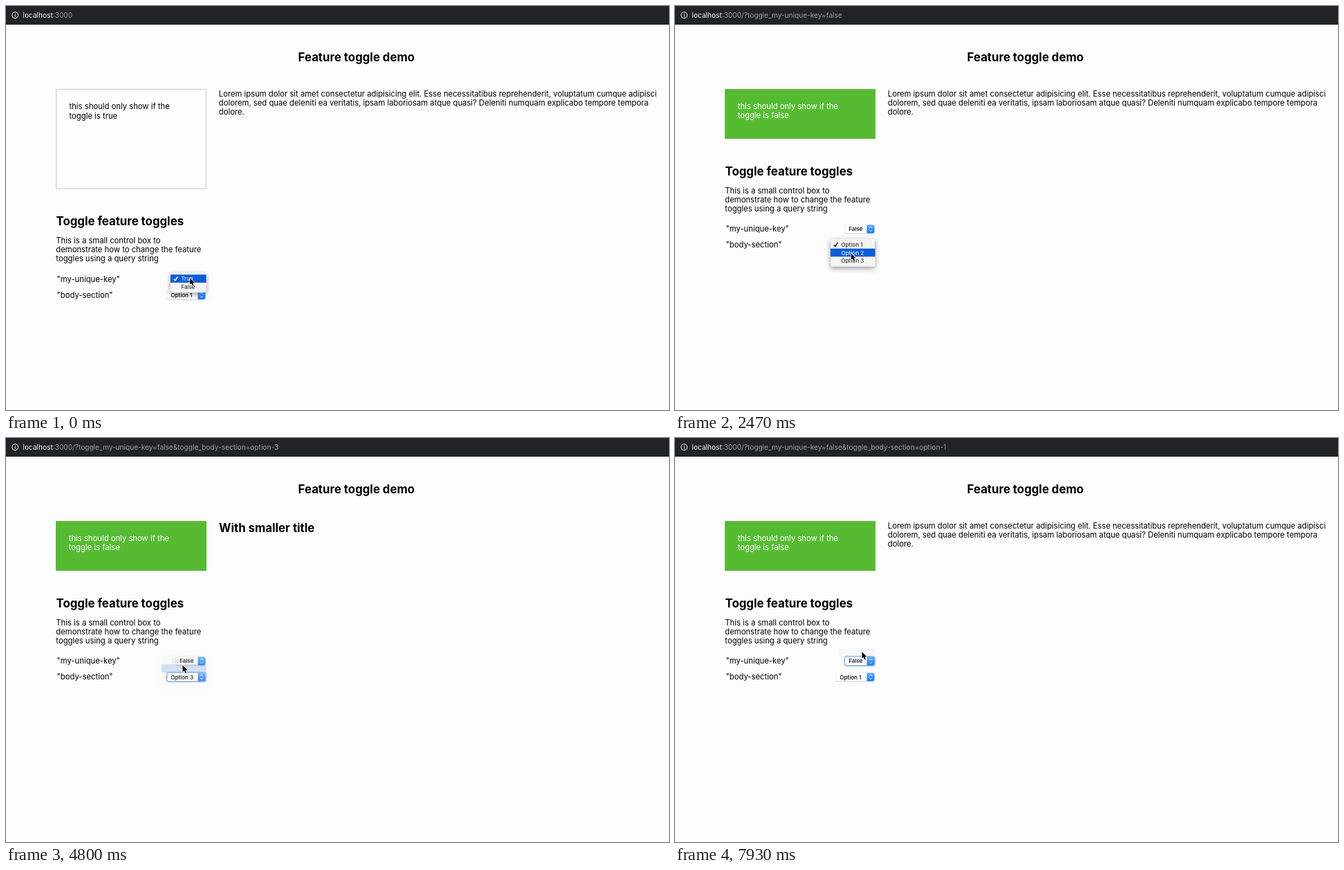
These frames come from a looping animation (959x584 px, 8000 ms). An HTML page with a canvas:

```html
<!DOCTYPE html>
<html lang="en">
<head>
<meta charset="utf-8">
<title>Feature toggle demo</title>
<style>
  html, body { margin: 0; width: 100%; height: 100%; overflow: hidden; background: #fefdfe; }
  canvas { display: block; width: 959px; height: 584px; }
</style>
</head>
<body>
<canvas id="stage"></canvas>
<script>
const W = 959, H = 584, LOOP = 8000, FRAME = 1000 / 15;
const ROW = 11.7, PAD = 2.6, FADE = 180;
const canvas = document.getElementById('stage');
const ctx = canvas.getContext('2d');
const ratio = window.devicePixelRatio || 1;
canvas.width = W * ratio;
canvas.height = H * ratio;

const BODY = '11.28px Inter, sans-serif';
const HEADING = 'bold 16.8px Inter, sans-serif';
const SMALL_HEADING = 'bold 13.6px Inter, sans-serif';
const ADDRESS = '10.15px Inter, sans-serif';
const CONTROL = '500 8.1px Inter, sans-serif';
const MENU_ITEM = '8.2px Inter, sans-serif';

const KEY_OPTIONS = ['True', 'False'];
const BODY_OPTIONS = ['Option 1', 'Option 2', 'Option 3'];

// Page states: start time, key value, body value, address query, focused select
const pages = [
  { at: 0, key: 0, body: 0, query: '', focus: 'key' },
  { at: 1070, key: 1, body: 0, query: '/?toggle_my-unique-key=false', focus: 'key' },
  { at: 2250, focus: 'body' },
  { at: 2960, body: 2, query: '/?toggle_my-unique-key=false&toggle_body-section=option-3' },
  { at: 4860, body: 1, query: '/?toggle_my-unique-key=false&toggle_body-section=option-2' },
  { at: 6530, body: 0, query: '/?toggle_my-unique-key=false&toggle_body-section=option-1' },
  { at: 7190, focus: 'key' }
];

// Each menu is open until `pick`, then fades out.
const menus = [
  { from: 0, pick: 840, select: 'key' },
  { from: 2250, pick: 2750, select: 'body' },
  { from: 4050, pick: 4650, select: 'body' },
  { from: 5530, pick: 6320, select: 'body' },
  { from: 7190, pick: 7760, select: 'key' }
];

// Pointer path: time, x, y
const path = [
  [0, 266, 393], [200, 266, 393], [600, 262, 406], [1720, 262, 406],
  [2130, 255, 345], [2300, 255, 345], [2620, 254.5, 368], [2960, 254.5, 368],
  [3150, 254.5, 356], [3560, 254.5, 356], [3850, 255, 345], [4150, 255, 345],
  [4500, 255.5, 328.5], [4950, 255.5, 328.5], [5350, 252.5, 346], [5850, 252.5, 346],
  [6150, 253, 332], [6500, 253, 332], [6860, 272, 322], [7250, 272, 322],
  [7560, 270.5, 309], [8000, 270.5, 309]
];

function pointerAt(t) {
  const i = Math.max(1, path.findIndex(p => p[0] > t));
  const [t0, x0, y0] = path[i - 1], [t1, x1, y1] = path[i];
  const u = (t - t0) / (t1 - t0), e = u * u * (3 - 2 * u);
  return { x: x0 + (x1 - x0) * e, y: y0 + (y1 - y0) * e };
}

function text(str, x, y, font = BODY, color = '#000') {
  ctx.font = font;
  ctx.fillStyle = color;
  ctx.fillText(str, x, y);
}

function lines(list, x, y, color) {
  list.forEach((line, i) => text(line, x, y + i * 13.1, BODY, color));
}

function rounded(x, y, w, h, r, fill) {
  ctx.beginPath();
  ctx.roundRect(x, y, w, h, r);
  ctx.fillStyle = fill;
  ctx.fill();
}

function stroke(points, color, width) {
  ctx.beginPath();
  points.forEach(([x, y]) => ctx.lineTo(x, y));
  ctx.strokeStyle = color;
  ctx.lineWidth = width;
  ctx.stroke();
}

function shadow(color, blur, dy) {
  ctx.shadowColor = color;
  ctx.shadowBlur = blur * ratio;
  ctx.shadowOffsetY = dy * ratio;
}

function drawAddressBar(query) {
  ctx.fillStyle = '#202427';
  ctx.fillRect(0, 0, W, 27);
  ctx.beginPath();
  ctx.arc(13.2, 13.2, 4.4, 0, 7);
  ctx.strokeStyle = '#e4e6e8';
  ctx.lineWidth = 1.1;
  ctx.stroke();
  ctx.fillStyle = '#e4e6e8';
  ctx.fillRect(12.7, 12.5, 1.1, 3.2);
  ctx.fillRect(12.7, 10.6, 1.1, 1.1);
  text('localhost', 24.5, 16.8, ADDRESS, '#f4f5f6');
  const hostWidth = ctx.measureText('localhost').width;
  text(':3000' + query, 24.5 + hostWidth, 16.8, ADDRESS, '#9b9fa3');
}

function drawFeature(key) {
  if (key === 0) {
    ctx.strokeStyle = '#d5d9dd';
    ctx.lineWidth = 1.5;
    ctx.strokeRect(72.8, 120.5, 216.6, 143.7);
    lines(['this should only show if the', 'toggle is true'], 91.5, 149.4);
  } else {
    ctx.fillStyle = '#56bb33';
    ctx.fillRect(72, 120, 218, 72);
    lines(['this should only show if the', 'toggle is false'], 90.7, 148.7, '#fff');
  }
}

function drawBody(option) {
  if (option === 0) {
    lines([
      'Lorem ipsum dolor sit amet consectetur adipisicing elit. Esse necessitatibus reprehenderit, voluptatum cumque adipisci',
      'dolorem, sed quae deleniti ea veritatis, ipsam laboriosam atque quasi? Deleniti numquam explicabo tempore tempora',
      'dolore.'
    ], 307.8, 130.6);
  } else if (option === 1) {
    text('With title', 308, 132.6, SMALL_HEADING);
    text('hello world', 307.8, 146.6);
  } else {
    text('With smaller title', 308, 136.2, HEADING);
  }
}

function drawSelect({ x, cy }, label, focused) {
  const w = 288.5 - x, top = cy - 6.1, h = 12.2;
  if (focused) rounded(x - 1.3, top - 1.4, w + 2.6, h + 2.8, 4, '#7db4f2');
  shadow('rgba(0,0,0,.3)', 1.5, 0.5);
  rounded(x, top, w, h, 3, '#fff');
  shadow('transparent', 0, 0);
  const blue = ctx.createLinearGradient(0, top, 0, top + h);
  blue.addColorStop(0, '#62aef8');
  blue.addColorStop(1, '#1470f5');
  rounded(277.5, top, 11, h, [0, 3, 3, 0], blue);
  for (const s of [-1, 1]) {
    stroke([[281, cy + s * 1.4], [283, cy + s * 3.4], [285, cy + s * 1.4]], '#fff', 1);
  }
  text(label, x + 5.2, cy + 3, CONTROL);
}

function drawMenu({ x, cy }, options, checked, pointerY, alpha) {
  const left = x - 8, w = 289.5 - left;
  const firstRow = cy - 0.7 - ROW * (checked + 0.5), top = firstRow - PAD;
  const h = options.length * ROW + PAD * 2;
  const hover = Math.floor((pointerY - firstRow) / ROW);

  ctx.globalAlpha = alpha;
  shadow(`rgba(0,0,0,${0.4 * alpha})`, 7, 2.5);
  rounded(left, top, w, h, 3, '#f4f4f4');
  shadow('transparent', 0, 0);
  options.forEach((label, i) => {
    const y = firstRow + i * ROW, color = i === hover ? '#fff' : '#111';
    if (i === hover) {
      ctx.fillStyle = '#0b5dd5';
      ctx.fillRect(left, y, w, ROW);
    }
    text(label, left + 15.3, y + 9.1, MENU_ITEM, color);
    if (i === checked) {
      stroke([[left + 4.8, y + 6.2], [left + 6.8, y + 8.6], [left + 10.4, y + 3]], color, 1.4);
    }
  });
  ctx.globalAlpha = 1;
}

function drawPointer({ x, y }) {
  ctx.save();
  ctx.translate(x, y);
  ctx.beginPath();
  [[0, 0], [0, 9.8], [2.2, 7.8], [3.8, 11.5], [5.5, 10.8], [3.9, 7.2], [6.9, 7.2]]
    .forEach(([px, py]) => ctx.lineTo(px, py));
  ctx.closePath();
  ctx.lineJoin = 'round';
  ctx.strokeStyle = '#fff';
  ctx.lineWidth = 1.4;
  ctx.stroke();
  ctx.fillStyle = '#000';
  ctx.fill();
  ctx.restore();
}

function draw(t) {
  const page = Object.assign({}, ...pages.filter(p => p.at <= t));
  const menu = menus.find(m => t >= m.from && t < m.pick + FADE);
  const pointer = pointerAt(t);
  const shift = page.key === 0 ? 72.4 : 0;
  const selects = {
    key: { x: 246, cy: 322.4 + shift },
    body: { x: 233, cy: 345.5 + shift }
  };

  ctx.setTransform(ratio, 0, 0, ratio, 0, 0);
  ctx.fillStyle = '#fefdfe';
  ctx.fillRect(0, 0, W, H);
  drawAddressBar(page.query);
  text('Feature toggle demo', 422.6, 79.8, HEADING);
  drawFeature(page.key);
  drawBody(page.body);

  text('Toggle feature toggles', 72.5, 245 + shift, HEADING);
  lines([
    'This is a small control box to',
    'demonstrate how to change the feature',
    'toggles using a query string'
  ], 72.3, 270.5 + shift);
  text('"my-unique-key"', 73.6, 326.2 + shift);
  text('"body-section"', 73.6, 349.3 + shift);

  drawSelect(selects.key, KEY_OPTIONS[page.key], page.focus === 'key');
  drawSelect(selects.body, BODY_OPTIONS[page.body], page.focus === 'body');
  if (menu) {
    const options = menu.select === 'key' ? KEY_OPTIONS : BODY_OPTIONS;
    const alpha = Math.min(1, (menu.pick + FADE - t) / FADE);
    drawMenu(selects[menu.select], options, page[menu.select], pointer.y, alpha);
  }
  drawPointer(pointer);
}

function tick() {
  const t = performance.now() % LOOP;
  draw(Math.min(LOOP - 1, Math.floor((t + 5) / FRAME) * FRAME));
  requestAnimationFrame(tick);
}
tick();
</script>
</body>
</html>
```
